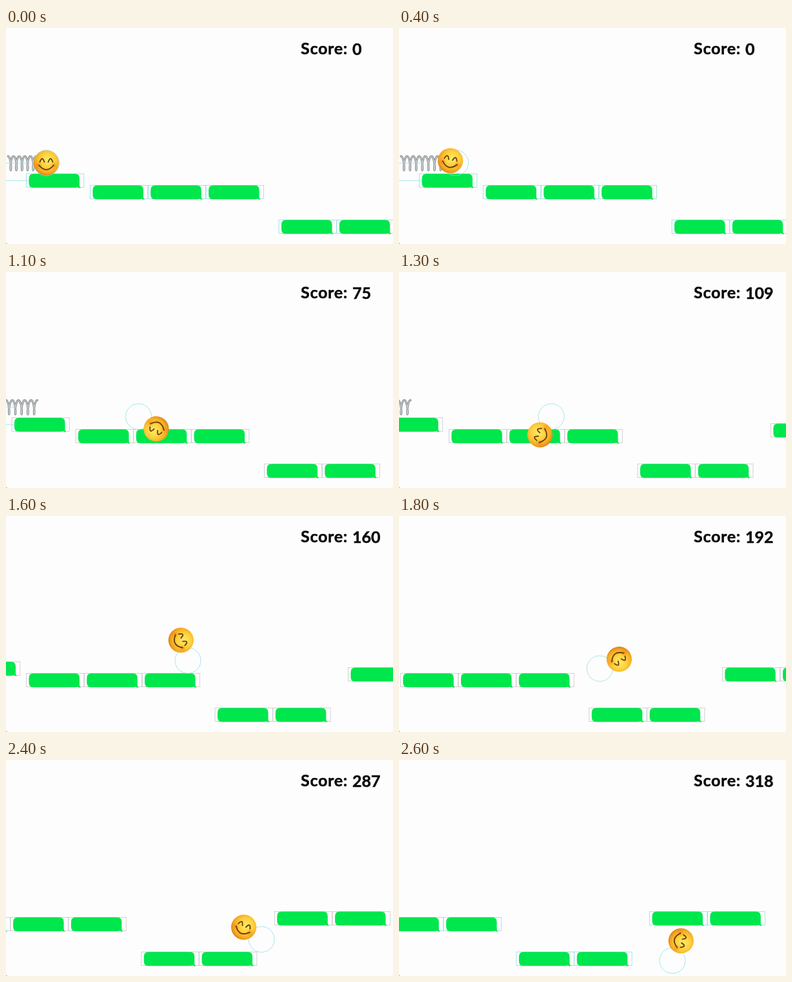
Write an HTML page that moves like this. It is 600 px wide and 337 px high and loops after 2.7 s.

```html
<!DOCTYPE html>
<html lang="en">
<head>
<meta charset="utf-8">
<title>Rolling ball</title>
<style>
html, body { margin: 0; width: 100%; height: 100%; overflow: hidden; background: #fefdfe; }
svg { display: block; width: 100vw; height: 100vh; }
text { font-family: "Chalkboard SE", Lato, sans-serif; font-weight: 700; font-size: 25px;
  fill: #0b0b0d; stroke: #0b0b0d; stroke-width: .5; stroke-linejoin: round; }
.label { letter-spacing: .7px; }
.debug { fill: none; stroke: #8fdfe0; stroke-width: .8; }
</style>
</head>
<body>
<svg viewBox="0 0 600 337">
  <defs>
    <radialGradient id="skin" cx=".56" cy=".4" r=".64">
      <stop offset="0" stop-color="#ffea6a"/>
      <stop offset=".45" stop-color="#fed03c"/>
      <stop offset=".78" stop-color="#f6a722"/>
      <stop offset="1" stop-color="#d67c12"/>
    </radialGradient>
    <radialGradient id="blush">
      <stop offset="0" stop-color="#f0781c" stop-opacity=".55"/>
      <stop offset="1" stop-color="#f0781c" stop-opacity="0"/>
    </radialGradient>
  </defs>
  <rect width="600" height="337" fill="#fefdfe"/>
  <path d="M0 334Q0 337 3 337H0Z" fill="#999"/>
  <g id="world">
    <g id="platforms"></g>
    <g fill="none" stroke-linecap="round" stroke-linejoin="round">
      <path class="coil" stroke="#7b8084" stroke-width="3"/>
      <path class="coil" stroke="#ccd0d2" stroke-width="1.3"/>
    </g>
    <path class="debug" d="M-2 211H38M-2 238H36"/>
  </g>
  <circle id="body" class="debug" r="20"/>
  <g id="face">
    <circle r="19.6" fill="url(#skin)"/>
    <circle cx="-12" cy="4" r="6" fill="url(#blush)"/>
    <circle cx="12" cy="4" r="6" fill="url(#blush)"/>
    <path d="M-10 -1.500Q-6.500 -11.500 -3 -1.500M3 -1.500Q6.500 -11.500 10 -1.500M-11.500 3.500Q0 17.500 11.500 3.500"
      fill="none" stroke="#69400c" stroke-width="1.9" stroke-linecap="round"/>
  </g>
  <text class="label" x="457" y="40.5">Score:</text>
  <text id="score" x="537" y="42"></text>
</svg>
<script>
const LOOP = 2700, STEP = 100, GRAVITY = 1320;
const $ = id => document.getElementById(id);
const clamp = (v, a = 0, b = 1) => Math.min(b, Math.max(a, v));

// screen x of the ball: [ms, px]
const track = [[250, 62.5], [700, 138], [1100, 205.5], [1600, 282], [2000, 340.4], [2400, 396.2], [2600, 424]];
// platform groups: [left, top, count]
const groups = [[31.5, 227.5, 1], [130.5, 245.5, 3], [423, 299.5, 2], [629.5, 236.5, 2]];
const PITCH = 89.8;

$('platforms').innerHTML = groups.map(([left, top, n]) =>
  Array.from({ length: n }, (_, i) => `<g transform="translate(${left + i * PITCH} ${top})">
    <rect class="debug box" width="89.3" height="21"/>
    <path fill="#00e64d" d="M11 0H75.500Q82.500 0 82.500 7V18Q82.500 20.500 84.500 22.300Q81.500 22.500 79.500 20.800Q78 21.800 75.500 21.800H11Q4 21.800 4 14.800V7Q4 0 11 0Z"/>
  </g>`).join('')).join('');

const boxes = document.querySelectorAll('.box');
const coils = document.querySelectorAll('.coil');

function ballX(t) {
  if (t <= track[0][0]) return track[0][1];
  let i = 1;
  while (i < track.length - 1 && t > track[i][0]) i++;
  const [t0, x0] = track[i - 1], [t1, x1] = track[i];
  return x0 + (x1 - x0) * (t - t0) / (t1 - t0);
}

const drop = (t, start) => GRAVITY / 2 * (Math.max(0, t - start) / 1000) ** 2;

function ballY(t) {
  if (t < 1662) return Math.min(225.5, 210.5 + drop(t, 637));
  if (t < 2375) return Math.min(279.5, 225.5 + drop(t, 1662));
  return 279.5 + drop(t, 2375);
}

function spin(t, x) {
  if (t < 700) return 41 * clamp((t - 250) / 450);
  if (t < 1100) return 41 + 164 * (t - 700) / 400;
  return 205 + (x - 205.5) * 2.83;
}

function coilPath(width) {
  const turns = 7, per = 20;
  let d = '';
  for (let i = 0; i <= turns * per; i++) {
    const a = i / per * 2 * Math.PI;
    const x = 3 + width * i / (turns * per) + 2.2 * Math.sin(a);
    d += (i ? 'L' : 'M') + x.toFixed(1) + ' ' + (211 - 11 * Math.cos(a)).toFixed(1);
  }
  return d;
}

function draw(t) {
  const x = ballX(t), y = ballY(t), angle = spin(t, x);
  const scroll = Math.max(0, x - 183);
  const grow = clamp((t - 250) / 450);
  const reach = 33.5 * grow * grow * (3 - 2 * grow);
  const dir = (angle + 190) * Math.PI / 180;

  $('world').setAttribute('transform', `translate(${-scroll} 0)`);
  $('body').setAttribute('cx', x);
  $('body').setAttribute('cy', y);
  $('face').setAttribute('transform',
    `translate(${x + reach * Math.cos(dir)} ${y + reach * Math.sin(dir)}) rotate(${angle})`);

  const d = coilPath(61 + 7 * clamp((t - 250) / 200));
  coils.forEach(c => c.setAttribute('d', d));
  const tint = scroll > 0 && t < 2500 ? '#c6c8c8' : '#8fdfe0';
  boxes.forEach(b => b.style.stroke = tint);
  $('score').textContent = Math.max(0, Math.round((x - 138) / 0.9));
}

const start = performance.now();
function tick(now) {
  const t = Math.max(0, now - start) % LOOP;
  draw(Math.floor(t / STEP) * STEP);
  requestAnimationFrame(tick);
}
draw(0);
requestAnimationFrame(tick);
</script>
</body>
</html>
```
